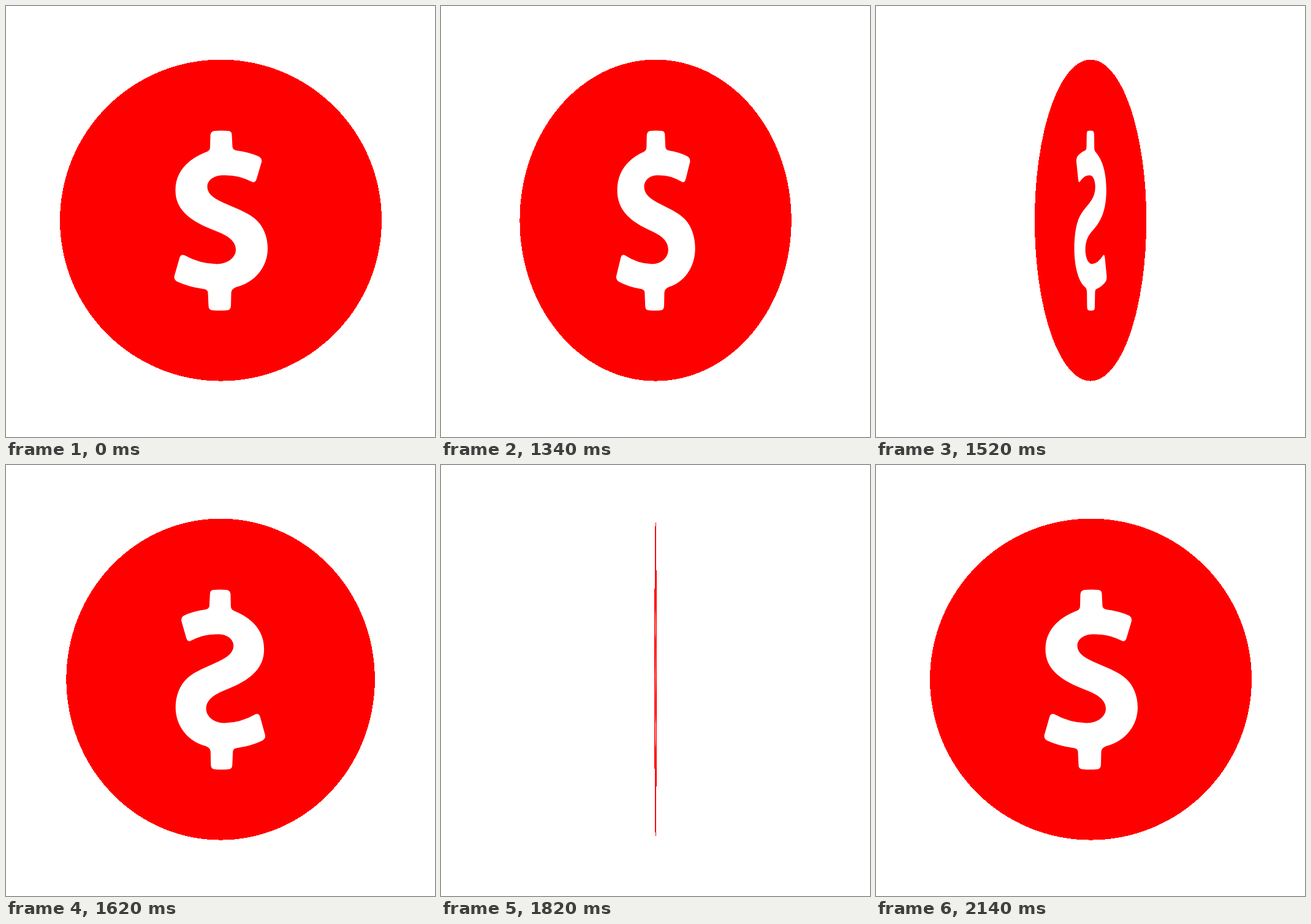
Write an HTML page that moves like this. It is 700 px wide and 704 px high and loops after 2.98 s.

```html
<!DOCTYPE html>
<html lang="en">
<head>
<meta charset="utf-8">
<title>Spinning coin</title>
<style>
  html, body { margin: 0; width: 100%; height: 100%; overflow: hidden; background: #fff; }
  svg { display: block; width: 100%; height: 100%; }
</style>
</head>
<body>
<svg viewBox="0 0 700 704">
  <g id="coin">
    <circle cx="350.5" cy="350.1" r="262.5" fill="#f00" shape-rendering="crispEdges"/>
    <path fill="#fff" d="M340 204 Q351 203 363 204 Q368 204.5 368.5 210 L369.5 230
      Q370 235 376 236 Q398 239 413 246 Q418 249 417 255 L409 282 Q407 289 402 287.5
      C388 281 377 276.5 354 276.5 C339 276.5 328.5 285 328.5 295
      C328.5 308 341 315.5 362 324.5 C383 333.5 397 339 408 349 C420 360 427 377 427 396
      C427 427 405 452 376 459 Q368 462 367.5 468 L367 490 Q366.5 496.5 361 497
      Q349 498 337 497 Q330.5 496.5 330.5 490 L329.5 468 Q329 463.5 324 462.5
      Q298 459 279 450 Q273 446 275 440 L283 412 Q285 405 291 407
      Q316 421 344 421.5 C362 421 375 411 375 398 C375 384 362 375.5 346 369
      C330 362.5 312 356 296 342.5 C282 330 276.5 317 276.5 301
      C276.5 270 297 250 328 238 Q333 236 333 230 L333.5 211 Q334 205 340 204Z"/>
  </g>
</svg>
<script>
  const LOOP = 2980, STEP = 20;
  const TURN_START = 1158, TURN_LENGTH = 984;
  const MOVE_START = 1180, MOVE_END = 2140;
  const COIN_X = 350.5, AXIS_X = 350.1;
  const coin = document.getElementById('coin');

  const smoothstep = u => u * u * (3 - 2 * u);

  function draw(time) {
    const t = Math.floor((time % LOOP) / STEP) * STEP;
    if (t < MOVE_START || t >= MOVE_END) {
      coin.removeAttribute('transform');
      return;
    }
    const turn = smoothstep((t - TURN_START) / TURN_LENGTH);
    const width = Math.cos(2 * Math.PI * turn);
    coin.setAttribute('transform',
      `translate(${AXIS_X} 0) scale(${width.toFixed(5)} 1) translate(${-COIN_X} 0)`);
  }

  const start = performance.now();
  function tick() {
    draw(performance.now() - start);
    requestAnimationFrame(tick);
  }
  tick();
</script>
</body>
</html>
```
